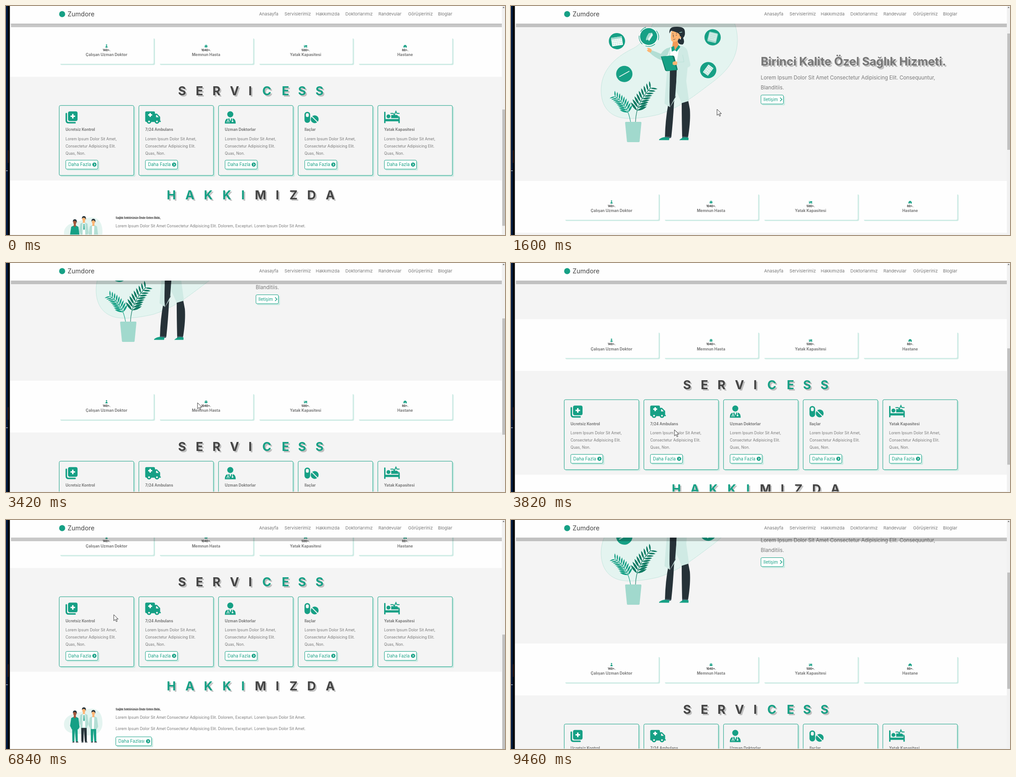
An HTML page for the animation above (9660 ms loop, 1102 px wide and 508 px high).

```html
<!DOCTYPE html>
<html lang="tr">
<head>
<meta charset="utf-8">
<title>Zumdore</title>
<style>
  html, body { margin: 0; width: 100%; height: 100%; overflow: hidden; background: #fefefe; }
  svg { display: block; width: 1102px; height: 508px; font-family: Inter, "Open Sans", sans-serif; }
  text { fill: #777; }
  .b { font-weight: 700; }
  .dark { fill: #444; }
  .green { fill: #16a085; }
  .shade { fill: #000; fill-opacity: .22; }
  .btn .box { fill: #fff; stroke: #16a085; }
  .btn text, .btn .dot { fill: #16a085; }
  .btn .chev { stroke: #16a085; }
  .btn .mark { stroke: #fff; }
  .btn.on .box { fill: #16a085; }
  .btn.on .mark { stroke: #16a085; }
  .btn.on text, .btn.on .dot { fill: #fff; }
  .btn.on .chev { stroke: #fff; }
</style>
</head>
<body>
<svg id="stage" viewBox="0 0 1102 508"></svg>
<script>
const GREEN = '#16a085', PALE = '#cdebe4', INK = '#263238', SKIN = '#ffb573', GREY = '#f4f4f4';
const LOOP = 9660, STEPS = 48;

const rect = (x, y, w, h, fill, r = 0) =>
  `<rect x="${x}" y="${y}" width="${w}" height="${h}" rx="${r}" fill="${fill}"/>`;
const disc = (x, y, r, fill = GREEN) => `<circle cx="${x}" cy="${y}" r="${r}" fill="${fill}"/>`;
const path = (d, fill = GREEN) => `<path d="${d}" fill="${fill}"/>`;
const line = (d, stroke, w = 1, extra = '') =>
  `<path d="${d}" fill="none" stroke="${stroke}" stroke-width="${w}" ${extra}/>`;
const text = (x, y, size, str, cls = '', anchor = 'start') =>
  `<text x="${x}" y="${y}" font-size="${size}" class="${cls}" text-anchor="${anchor}">${str}</text>`;
const shadowed = (x, y, size, str, cls, d, anchor) =>
  text(x + d, y + d, size, str, 'b shade', anchor) + text(x, y, size, str, cls, anchor);
const at = (x, y, body, extra = '') => `<g transform="translate(${x} ${y}) ${extra}">${body}</g>`;

function heading(word, split, xs, y, first, second) {
  const row = (d, a, b) => [...word].map((c, i) =>
    text(xs[i] + d, y + d, 27, c, `b ${i < split ? a : b}`)).join('');
  return row(3, 'shade', 'shade') + row(0, first, second);
}

function button(id, x, y, w, label, round = true) {
  const cx = x + w - 8, cy = y + 10.3;
  const icon = round
    ? `<circle class="dot" cx="${cx}" cy="${cy}" r="4.6"/>` +
      `<path class="mark" d="M${cx - 1} ${cy - 2.2}l2.2 2.2l-2.2 2.2" fill="none" stroke-width="1.2"/>`
    : `<path class="chev" d="M${cx + .3} ${cy - 4}l4 4l-4 4" fill="none" stroke-width="1.5"/>`;
  return `<g class="btn" id="${id}">${rect(x + 3, y + 3, w, 20.5, PALE, 2.5)}
    <rect class="box" x="${x + .5}" y="${y + .5}" width="${w - 1}" height="19.8" rx="2.5"/>
    ${text(x + 6, y + 13.8, 9.7, label)}${icon}</g>`;
}

// Paired leaves along a quadratic stem.
function frond([x0, y0], [x1, y1], [x2, y2], color, size) {
  let out = line(`M${x0} ${y0}Q${x1} ${y1} ${x2} ${y2}`, color, 1.1);
  for (let k = 0; k < 9; k++) {
    const t = .3 + k * .085, u = 1 - t;
    const x = u * u * x0 + 2 * u * t * x1 + t * t * x2;
    const y = u * u * y0 + 2 * u * t * y1 + t * t * y2;
    const dir = Math.atan2(u * (y1 - y0) + t * (y2 - y1), u * (x1 - x0) + t * (x2 - x1)) * 180 / Math.PI;
    const s = size * (1.25 - t * .5);
    for (const side of [-1, 1])
      out += at(x, y, path(`M0 0Q${s * .5} ${-s * .22} ${s} 0Q${s * .5} ${s * .22} 0 0Z`, color),
        `rotate(${dir + side * 52})`);
  }
  return out;
}

function tools() {
  const W = '#fff', P = '#a1d9cd', cell = '#bfe3db';
  const grid = (n, m, dx, dy, x0, y0, w, h) => Array.from({ length: n * m }, (_, i) =>
    rect(x0 + i % n * dx, y0 + Math.floor(i / n) * dy, w, h, cell, .5)).join('');
  const tool = (x, y, body) => at(x, y, disc(0, 0, 18) + body);
  return tool(333.5, 97, at(0, 0, rect(-2.7, -7, 5.4, 13, W) + rect(-3.5, 6, 7, 1.5, W) + rect(-.4, -13, .8, 6, W) +
      rect(-.6, 7, 1.2, 4, W) + rect(-2.5, 11, 5, 1.3, W) + rect(-1.6, -2, 3.2, 6, P), 'rotate(-24)')) +
    tool(404, 118, at(0, 0, line('M-2.2 -11L2.6 5M2.2 -11L-2.6 5', W, 1.3) +
      line('M-1 7.5a2.4 2.9 0 1 1 -4.8 0a2.4 2.9 0 0 1 4.8 0M5.8 7.5a2.4 2.9 0 1 1 -4.8 0a2.4 2.9 0 0 1 4.8 0', W, 1.2), 'rotate(28)')) +
    tool(266.5, 126.5, disc(0, 0, 11.5, P) + disc(0, 0, 8.5)) +
    tool(234, 191.5, at(0, 0, rect(-12, -9, 24, 19, '#f2faf8', 1) + rect(-12, -9, 24, 4, P) +
      grid(5, 3, 4.4, 4.3, -10, -3, 2.4, 2), 'rotate(-10)')) +
    tool(445, 178, at(0, 0, rect(-10, -11, 20, 22, P, 3) + rect(-8.5, -9, 17, 16, '#cfeae4', 2) +
      line('M-6 -5h12M-6 -1h12M-6 3h10', P, .6), 'rotate(12)')) +
    tool(437, 251, at(0, 0, rect(-7, -10.5, 14, 21, '#e6f5f1', 1) +
      grid(3, 4, 4.4, 5, -5.8, -9, 3, 3.2), 'rotate(35)')) +
    tool(252, 264, line('M-11 6.5L11 -6.5', '#e6f5f1', 1.8));
}

function doctor() {
  const coat = '#cfeae4', fold = '#b3ded4';
  const legs = path('M348 250L366 250Q364 300 360 325Q358 365 354 402L340 401Q341 360 348 325Z', INK) +
    path('M366 250L377 325Q377 360 378 402L391 402Q397 365 395 340Q390 310 382 290Z', INK) +
    path('M340 400L354 401L353 404L339 404ZM378 400L391 401L390 404L378 404Z', '#455a64') +
    path('M327 407Q333 402 340 402L350 403L349 408.5H327ZM372 408Q378 403 383 402L392 403L392 408.5H372Z');
  const upper = path('M351 200Q358 193 366 194Q386 195 390 208L396 238Q397 242 390 245L387 275L393 320L377 325L366 300L364 245L352 250Q351 290 350 320L351 334L339 326Q342 280 346 240Z', coat) +
    path('M366 250L364 310L352 335L350 318L351 250Z', INK) +
    path('M367 250L365 307L350 336L362 317Z', coat) +
    path('M352 201L363 196L371 202L366 232L352 230Z', '#fff') +
    path('M352 199L346 216L332 228Q318 223 306 211L311 206Q322 210 331 214Q338 202 352 199Z', fold) +
    path('M311 205Q306 199 300 201L303 204L300 206Q303 211 309 211Z', SKIN) +
    path('M358 184L367 183L371 197L362 205L356 198Z', '#f29a55') +
    path('M354 199L360 196L362 206L355 209ZM362 206L370 194L374 198L366 209Z') +
    path('M373 162Q386 168 380 178Q385 188 379 193Q370 194 368 186Z', INK) +
    path('M354 164Q352 178 354 184Q358 189 365 186Q374 181 373 164Q364 156 354 164Z', SKIN) +
    path('M350 168Q348 154 361 153Q384 151 384 164Q385 174 380 178L374 177Q374 171 369 167Q360 163 354 162Q351 164 350 168Z', INK) +
    path('M372 174a3 3 0 1 1 1 6l-3 -2Z', SKIN) + disc(374, 180, 1.3, '#fff') +
    line('M372 166l6 -1', '#a1d9cd', 1.2) +
    line('M356 169l3 -1M364 168l3 0M358 181q3 2 5 -1M359 171l-1 5h2', INK, .7) +
    disc(358, 172, .8, INK) + disc(365, 172, .8, INK) +
    path('M331 220L357 218Q360 218 361 221L368 249Q368 251 366 251L344 253Q341 253 340 250Z', '#0f7a63') +
    path('M332 220L356 218L366 250L343 252Z') +
    path('M357 233Q362 229 367 232L367 238Q361 241 357 238Z', SKIN) +
    path('M388 205L396 238Q396 243 389 244L367 240V232L382 232L379 216Z', coat) +
    line('M379 216L382 232L367 233', fold, .7);
  const ring = line('M286 164A22 22 0 0 1 298 154M321 162A22 22 0 0 1 325 183M290 192A22 22 0 0 1 283 173M318 192A22 22 0 0 1 297 196', GREEN, 1.2);
  const hold = disc(304, 175, 20.5, '#fff') + disc(304, 175, 19) + ring +
    at(304, 175, path('M-3 -7L3 -11L5 5L-2 10Q-5 5 -3 -7Z', '#a1d9cd') +
      path('M3 -11L7 -7L5 9L1 6Z', '#e6f5f1'), 'rotate(25)');
  return legs + `<g id="upper">${upper}${hold}</g>`;
}

function hero() {
  const blob = 'M405 88C460 88 500 130 500 187C500 235 468 262 445 280C410 306 375 336 325 352C290 360 260 363 240 358C210 350 199 325 199 298C199 250 235 222 268 206C310 185 310 135 345 105C365 92 385 88 405 88Z';
  return rect(9, 0, 1086, 499, GREY) + path(blob, '#e4f4f0') +
    line(blob, '#9ad5c8', .7, 'stroke-dasharray="2 1"') + `<g id="tools">${tools()}</g>` +
    frond([275, 368], [276, 325], [309, 292], '#0f7a63', 21) +
    frond([264, 368], [258, 330], [229, 311], GREEN, 17) +
    path('M252 370Q252 368 254 368H286Q288 368 288 370L284 411Q284 413 281 413H259Q256 413 256 411Z', '#a1d9cd') +
    doctor() +
    shadowed(551.5, 243, 25.45, 'Birinci Kalite Özel Sağlık Hizmeti.', 'b', 3) +
    text(551.5, 274, 11.35, 'Lorem Ipsum Dolor Sit Amet Consectetur Adipisicing Elit. Consequuntur,') +
    text(551.5, 295.5, 11.35, 'Blanditiis.') + button('contact', 551.5, 308, 50.5, 'Iletişim', false);
}

const head = (x, s) => disc(x, -2 * s, 1.1 * s) + path(`M${x - 1.8 * s} ${2 * s}q0 ${-2.6 * s} ${1.8 * s} ${-2.6 * s}t${1.8 * s} ${2.6 * s}Z`);

function stats() {
  const items = [['140+.', 'Çalışan Uzman Doktor', head(0, 1.35)],
    ['1040+.', 'Memnun Hasta', head(-1.9, .9) + head(1.9, .9) + head(0, 1.1)],
    ['500+.', 'Yatak Kapasitesi', path('M-3.5 -3h1v3h6v3h-1v-1h-5v1h-1ZM-1.5 -2.5h5v2h-5Z')],
    ['80+.', 'Hastane', path('M-3.5 -1.5h1.5v-1.5h4v1.5h1.5V2.8h-2.7v-2h-1.6v2h-2.7Z')]];
  return items.map(([num, label, icon], i) => {
    const x = 117 + i * 219.8, mid = x + 105;
    return rect(x + 3, 529, 209, 59, PALE, 3) + rect(x, 526, 209, 59.3, '#fefefe', 3) + at(mid, 546.5, icon) +
      shadowed(mid, 556.5, 6.1, num, 'b dark', 1.2, 'middle') + text(mid, 568, 8.5, label, 'b', 'middle');
  }).join('');
}

function services() {
  const cross = (x, y, s) => line(`M${x - s} ${y}h${2 * s}M${x} ${y - s}v${2 * s}`, '#fff', 3.2);
  const items = [
    ['Ucretsiz Kontrol', rect(5.5, 0, 21, 21.5, GREEN, 4) + cross(16, 10.8, 5) +
      line('M1.7 5V20Q1.7 25.2 7 25.2H21', GREEN, 3.4, 'stroke-linecap="round"')],
    ['7/24 Ambulans', path('M3 0H19Q21.5 0 21.5 2.5V5H26L33 12V21H34.5V23.5H3Q0 23.5 0 20.5V3Q0 0 3 0ZM24 8V13H30L25.5 8Z') +
      cross(11, 8, 4.3) + [8.5, 26].map(x => disc(x, 22.5, 5) + disc(x, 22.5, 2, GREY)).join('')],
    ['Uzman Doktorlar', disc(12, 6.5, 6.7) + path('M0 27Q0 15.5 8 15.5H16Q24 15.5 24 27Z') +
      line('M7 15V20M5 25V22Q7 19 9 22V25M16.5 15V20', '#fff', 1.3) + disc(17, 22, 1.8, '#fff') + path('M10 15.5L12 22L14 15.5Z', '#fff')],
    ['Ilaçlar', rect(0, 1, 12.5, 24.5, GREEN, 6.2) + rect(3, 4, 6.5, 8.5, GREY, 3) +
      disc(22.5, 17.5, 8.7) + line('M15 10L30 25', GREY, 2)],
    ['Yatak Kapasitesi', path('M0 1H3V17H31.5V10Q34.5 11 34.5 15V26H31.5V22H3V26H0Z') + disc(9.5, 11, 4.3) +
      path('M15.5 8H28Q31.5 9 31.5 15H15.5Z') + line('M14 4.5H20L22.5 8L26 0L28 4.5H34', GREEN, 2)]];
  return rect(9, 614, 1086, 230, GREY) +
    heading('SERVICESS', 5, [380, 419, 456, 494.5, 535.5, 566, 609, 645, 683.5], 654.5, 'dark', 'green') +
    items.map(([title, icon], i) => at(117 + i * 175.9, 677.2,
      rect(3, 3, 165.5, 155.5, PALE, 3) +
      `<rect x=".5" y=".5" width="164.8" height="155.2" rx="3" fill="${GREY}" stroke="${GREEN}"/>` +
      at(14.5, 13.5, icon) + text(14.5, 57.3, 8.3, title, 'b') +
      ['Lorem Ipsum Dolor Sit Amet,', 'Consectetur Adipisicing Elit.', 'Quas, Non.'].map((s, k) =>
        text(14.5, 77.4 + k * 16.2, 8.4, s)).join('') +
      button('more' + i, 14.5, 121.3, 71.8, 'Daha Fazla'))).join('');
}

function about() {
  const person = (x, top, skin, hair, wear, legs, h) => at(x, top,
    path(`M-6 ${h * .5}L-5.5 ${h - 3}H-1L0 ${h * .6}L2 ${h - 3}H6.5L6 ${h * .45}Z`, legs) +
    path(`M-6 ${h - 1}q2 -3 5 -2v2ZM2 ${h - 1}q0 -3 5 -2l1 2Z`, INK) +
    path(`M-8 17Q0 11 8 17L10.5 37L7.5 42L7 ${h * .58}H-7L-7.5 40L-10.5 34Z`, wear) +
    path('M-2 9H2L2.5 15L0 18L-2.5 15Z', skin) +
    `<ellipse cy="6.5" rx="3.6" ry="4.8" fill="${skin}"/>` +
    path('M-4.3 7Q-5 0 0 0Q5.5 0 4.3 8Q3 3 -1 3.5Q-4 4 -4.3 7Z', hair));
  const para = 'Lorem Ipsum Dolor Sit Amet Consectetur Adipisicing Elit. Dolorem, Excepturi. Lorem Ipsum Dolor Sit Amet.';
  return heading('HAKKIMIZDA', 5, [355, 396, 437, 478, 519.5, 549.5, 595.5, 626, 665, 706], 885.5, 'green', 'dark') +
    path('M128 960C130 935 160 938 175 929C200 919 214 935 213 960C211 990 178 987 165 982C145 983 128 978 128 960Z', '#e4f4f0') +
    person(152, 930, '#a4563a', INK, GREEN, GREEN, 72) + person(193, 929, SKIN, INK, '#b3ded4', GREEN, 73) +
    path('M190 945h5l-1 26h-4Z', '#fff') +
    person(172, 923, SKIN, INK, '#b3ded4', INK, 79) + path('M169.5 938h5l.5 30h-6Z', '#fff') + path('M171.5 940h1.5l.6 12l-1.5 2l-1.2 -2Z') +
    shadowed(242, 929, 5.6, 'Sağlık Sektörünün Önde Gelen Ekibi,', 'b dark', 1.2) +
    text(242, 948, 8.4, para) + text(242, 973, 8.4, para) + button('about', 242, 988, 79.8, 'Daha Fazlası');
}

function chrome() {
  const nav = { Anasayfa: 559, Servislerimiz: 615, Hakkımızda: 684, Doktorlarımız: 749.5, Randevular: 822.5, Görüşleriniz: 888, Bloglar: 954 };
  return `<rect x="11" y="39" width="1084" height="8" fill-opacity=".21"/>` + rect(9, 0, 1086, 39, '#fefefe') +
    disc(124, 18, 6.7) + text(136, 23, 14, 'Zumdore', 'dark') +
    Object.entries(nav).map(([label, x]) => text(x, 21.2, 9.6, label)).join('') +
    rect(9, 507, 1086, 1, '#ececec') +
    rect(1095, 0, 7, 508, '#f1f1f1') + `<rect id="thumb" x="1096" width="6" height="258" fill="#c1c1c1"/>` +
    `<path id="arrow" d="M1096.8 4.2L1098.8 1.8L1100.8 4.2Z"/>` +
    rect(0, 0, 4, 508, '#00193f') + rect(4, 0, 4, 508, '#000') +
    rect(4, 320, 2, 28, '#3a1c08') + rect(0, 365, 4, 1, '#dfe6ee') + rect(8, 0, 1, 508, '#777');
}

const stage = document.getElementById('stage');
stage.innerHTML = rect(0, 0, 1102, 508, '#fefefe') +
  `<g id="page">${hero()}${stats()}${services()}${about()}</g>${chrome()}
  <g id="cursor" stroke="#222" stroke-width=".9" fill="#fff" stroke-linejoin="round">
    <path id="pointer" d="M0 0V13.5L3.2 10.6L5.6 15.5L7.7 14.5L5.4 9.8H9.8Z"/>
    <path id="hand" d="M-1.3 1Q0 -1.2 1.4 1V7Q2.8 5.6 4 7.2Q5.2 6.2 6.4 7.8Q8.6 7 8.8 9.4V13Q8.4 15.5 7.2 18H-1.2Q-2 15 -4.6 12Q-6.4 9.6 -4.6 9Q-3 8.9 -1.3 11.4Z"/>
  </g>`;
const el = Object.fromEntries([...stage.querySelectorAll('[id]')].map(n => [n.id, n]));

// Each key: step, then values.
const scrollKeys = [[0, 457], [8, 111], [10, 0], [13, 0], [15, 80], [17, 238], [21, 511], [33, 511], [34, 507.5], [35, 380], [36, 225], [47, 225]];
const cursorKeys = [[1, 470, 300], [8, 455, 229], [11, 575, 318], [13, 583, 322], [15, 520, 315], [17, 423, 310], [20, 330, 400],
  [22, 252, 479], [24, 248, 478], [25, 246, 465], [27, 135, 330], [30, 180, 255], [34, 238, 210], [37, 240, 215], [41, 690, 342]];

function track(keys, i) {
  const k = Math.max(1, keys.findIndex(key => key[0] >= i));
  const a = keys[k - 1], b = keys[k], p = (i - a[0]) / (b[0] - a[0]);
  return a.slice(1).map((v, n) => v + (b[n + 1] - v) * p);
}

const inside = (x, y, [bx, by, w, h]) => x >= bx && x <= bx + w && y >= by && y <= by + h;
const targets = { contact: [551.5, 308, 50.5, 20.5], about: [242, 988, 79.8, 20.5] };

function draw(ms) {
  const step = Math.min(STEPS - 1, Math.floor((ms + 15) * STEPS / LOOP));
  const [scroll] = track(scrollKeys, step);
  const sway = (1 - Math.cos((step - 13) / STEPS * 10 * Math.PI)) / 2;
  el.page.setAttribute('transform', `translate(0 ${-scroll})`);
  el.tools.setAttribute('transform', `rotate(${1.4 * sway} 341 190)`);
  el.upper.setAttribute('transform', `translate(0 ${413 * .016 * sway}) scale(1 ${1 - .016 * sway})`);
  el.thumb.setAttribute('y', 7 + scroll * .487);
  el.arrow.setAttribute('fill', scroll ? '#505050' : '#a3a3a3');

  const shown = step >= 1 && step <= 41;
  const [x, y] = shown ? track(cursorKeys, step) : [-50, -50];
  let over = false;
  for (const id in targets) {
    const hit = shown && inside(x, y + scroll, targets[id]);
    el[id].classList.toggle('on', hit);
    over = over || hit;
  }
  el.cursor.setAttribute('transform', `translate(${x} ${y})`);
  el.hand.setAttribute('visibility', over ? 'visible' : 'hidden');
  el.pointer.setAttribute('visibility', over ? 'hidden' : 'visible');
}

const start = performance.now();
function tick() {
  draw((performance.now() - start) % LOOP);
  requestAnimationFrame(tick);
}
tick();
</script>
</body>
</html>
```
